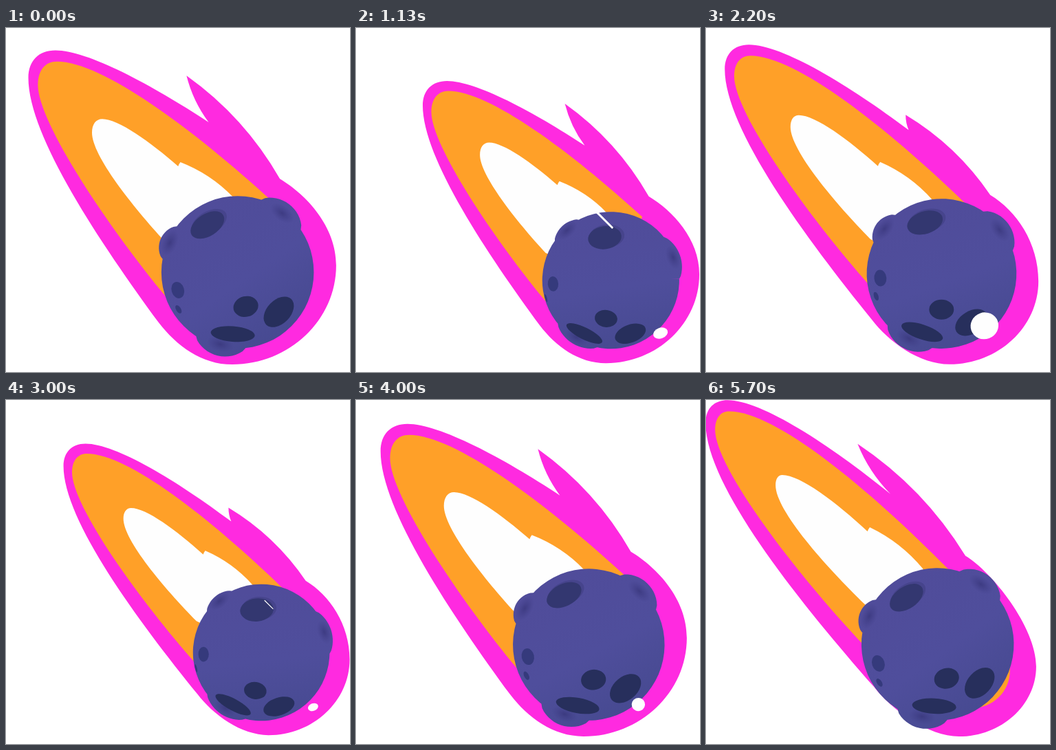
Animation, 500 px wide and 500 px high, one loop 5.73 s. Source, as an HTML page with a canvas:

```html
<!DOCTYPE html>
<html lang="en">
<head>
<meta charset="utf-8">
<title>Comet</title>
<style>
  html, body { margin: 0; width: 100%; height: 100%; overflow: hidden; background: #fff; }
  canvas { display: block; width: 500px; height: 500px; }
</style>
</head>
<body>
<canvas id="stage" width="500" height="500"></canvas>
<script>
const ctx = document.getElementById('stage').getContext('2d');
const LOOP = 5730, CYCLE = 48, TAU = Math.PI * 2;
const PINK = '#ff2ae0', ORANGE = '#ffa028', WHITE = '#fefefe';
const DARK = '#272f5c', DUSK = '#353a7c';
const rad = d => d * Math.PI / 180;

// All shapes are drawn in planet radii around the planet's centre.

// Eased swing 0..1..0 over one cycle
function swing(f) {
  let x = (f % CYCLE) / (CYCLE / 2);
  if (x > 1) x = 2 - x;
  const half = v => Math.pow(2 * v, 2.5) / 2;
  return x < .5 ? half(x) : 1 - half(1 - x);
}

// Rounded tongue from its left foot, around the tip, to its right foot
function tongue([lx, ly], [tx, ty], [ux, uy], [rx, ry], belly) {
  const dx = tx - lx, dy = ty - ly;
  ctx.bezierCurveTo(lx + .44 * dx, ly + .32 * dy, tx, ty - belly * dy, tx, ty);
  ctx.bezierCurveTo(tx, ty + .62 * (uy - ty), ux - .62 * (ux - tx), uy, ux, uy);
  const w = rx - ux, h = ry - uy;
  ctx.bezierCurveTo(ux + .21 * w, uy, rx - .37 * w, ry - .52 * h, rx, ry);
}

function bow([px, py], [qx, qy], b) {
  ctx.quadraticCurveTo((px + qx) / 2 + b * (qy - py), (py + qy) / 2 - b * (qx - px), qx, qy);
}

function horn(root, tip, base) {
  bow(root, tip, .1);
  bow(tip, base, .11);
}

function fill(color) {
  ctx.fillStyle = color;
  ctx.fill();
}

function oval(x, y, rx, ry, angle, color) {
  ctx.beginPath();
  ctx.ellipse(x, y, rx, ry, angle, 0, TAU);
  fill(color);
}

// Four drawings per flicker: e stretches the tail, age moves the lick backwards
function drawFlame(f) {
  const e = 1 - Math.cos(f % 4 * TAU / 4);
  const age = (f + 1) % 4, young = Math.pow(.1, age);
  const tip = (x, y, k = 1) => [x - .15 * k * e, y - .178 * k * e];
  const top = (x, y, k = 1) => [x - .183 * k * e, y - .146 * k * e];

  const foot = [-1.036 + .1 * e, .658 - .05 * e];
  const root = [-.38 - .06 * (age - 1) ** 2, -1.973 + .056 * young];
  const lick = [-.48 - .19 * age, -2.63 + .51 * young];
  const base = [.65 - .095 * age, -1.24 + .04 * e + .15 * young];
  const right = [1.293, -.09 + .19 * e], low = [-.07 + .175 * e, 1.21];
  ctx.beginPath();
  ctx.moveTo(...foot);
  tongue(foot, tip(-2.745, -2.55), top(-2.39, -2.91), root, .24);
  horn(root, lick, base);
  ctx.bezierCurveTo(base[0] + .35, base[1] + .21, right[0], right[1] - .51, ...right);
  ctx.bezierCurveTo(right[0], right[1] + .55 * (low[1] - right[1]),
    low[0] + .55 * (right[0] - low[0]), low[1], ...low);
  ctx.bezierCurveTo(low[0] - .4, low[1], foot[0] + .234, foot[1] + .306, ...foot);
  fill(PINK);

  const left = [-.946 - .02 * e, .315 - .16 * e];
  ctx.beginPath();
  ctx.moveTo(...left);
  tongue(left, tip(-2.62, -2.46), top(-2.37, -2.765), [.46 - .15 * e, -.925 - .02 * e], .18);
  ctx.lineTo(0, 0);
  fill(ORANGE);

  const side = [-.95, -.4 - .06 * e], notch = [-.78 - .07 * e, -1.39 - .045 * e];
  ctx.beginPath();
  ctx.moveTo(...side);
  tongue(side, tip(-1.91, -1.83, .72), top(-1.775, -2.01, .72), notch, .21);
  horn(notch, [notch[0] + .03, notch[1] - .055], [-.063 - .065 * e, -.99]);
  ctx.lineTo(0, 0);
  fill(WHITE);

  if (e > 1.5) oval(.45, .34, .5, .5, 0, ORANGE);
}

// Mound on the rim: centre and width in degrees, height
function bump(mid, width, height) {
  ctx.moveTo(0, 0);
  for (let i = 0; i <= 16; i++) {
    const a = rad(mid + width * (i / 16 - .5));
    const r = 1 + height * Math.pow(Math.sin(Math.PI * i / 16), .7);
    ctx.lineTo(r * Math.cos(a), r * Math.sin(a));
  }
  ctx.closePath();
}

function hollow(angle) {
  ctx.save();
  ctx.rotate(rad(angle));
  ctx.translate(.97, 0);
  ctx.scale(.1, .18);
  const g = ctx.createRadialGradient(0, 0, 0, 0, 0, 1);
  g.addColorStop(0, 'rgba(54,52,120,.7)');
  g.addColorStop(1, 'rgba(60,58,130,0)');
  oval(0, 0, 1, 1, 0, g);
  ctx.restore();
}

// Crater on a ball: tilt s slides it, the rim flattens it
function crater(x, y, size, flat, color, s) {
  const depth = Math.sqrt(1 - x * x - y * y);
  const cx = x + .08 * depth * s;
  const cy = y + (.1 * depth + .2 * x * Math.min(x, 0)) * s;
  const squash = flat * Math.sqrt(1 - cx * cx - cy * cy);
  oval(cx, cy, size * squash, size, Math.atan2(cy, cx), color);
}

function drawPlanet(turn, s) {
  const flat = 1 - .4 * s;
  const mounds = [[-53 + 8 * s, 38, .12], [203.5, 27, .1], [103.5 - 8 * s, 39, .125]];
  ctx.save();
  ctx.rotate(rad(turn));
  ctx.beginPath();
  ctx.arc(0, 0, 1, 0, TAU);
  for (const [mid, width, height] of mounds) bump(mid, width, height * flat);
  const body = ctx.createLinearGradient(-.5, -.8, .6, .8);
  body.addColorStop(0, '#504c9a');
  body.addColorStop(.55, '#4f4e9c');
  body.addColorStop(1, '#474a91');
  fill(body);
  ctx.clip();
  for (const [mid] of mounds) hollow(mid);

  crater(-.375, -.65, .255, .88, '#46448c', s);
  crater(-.396, -.62, .245, .88, '#333770', s);
  crater(.54, .52, .235, 1, DARK, s);
  crater(.108, .45, .165, .92, DARK, s);
  crater(-.063, .81, .29, .6, DARK, s);
  crater(-.784, .234, .11, 1.3, DUSK, s);
  crater(-.775, .486, .06, 1.3, DUSK, s);
  ctx.restore();
}

function drawSparks(f, s) {
  // A dot swells at the lower rim twice per cycle
  const u = f % 24 - 3;
  if (u >= 0 && u <= 9) {
    const size = (u <= 4 ? 6 + 3.5 * u + 2.5 * s : 20 - 4 * (u - 4)) / 109;
    oval(.68 - .03 * u + .08 * s, .82 - .03 * u - .02 * s, size, size * (1 - .3 * s), -.35, WHITE);
  }
  // A sliver darts over the top
  const k = f - 27;
  if (k >= 0 && k <= 2) {
    const x = .11 - .2 * k, y = -.7 - .18 * k, half = .06 + .05 * k;
    ctx.beginPath();
    ctx.moveTo(x - half, y - half);
    ctx.lineTo(x + half, y + half);
    ctx.strokeStyle = WHITE;
    ctx.lineWidth = .012 + .018 * k;
    ctx.lineCap = 'round';
    ctx.stroke();
  }
}

// 25 steps a second shown on a 30 Hz grid: every fifth step holds twice as long
function stepAt(ms) {
  const slot = Math.floor(ms * .03 + .11);
  return 5 * Math.floor(slot / 6) + Math.max(0, slot % 6 - 1);
}

function draw(ms) {
  const f = stepAt(ms) % CYCLE;
  const s = swing(f + .7);
  const turn = 34.6 * (swing(f + 4.7) - .048);
  const r = 110.8 - 11.8 * s;
  ctx.setTransform(1, 0, 0, 1, 0, 0);
  ctx.fillStyle = '#fff';
  ctx.fillRect(0, 0, 500, 500);
  ctx.translate(336.6 + 35.4 * s, 355 + 12.3 * s);
  ctx.scale(r, r);
  drawFlame(f);
  drawPlanet(turn, s);
  drawSparks(f, s);
}

const start = performance.now();
function tick() {
  draw((performance.now() - start) % LOOP);
  requestAnimationFrame(tick);
}
tick();
</script>
</body>
</html>
```
